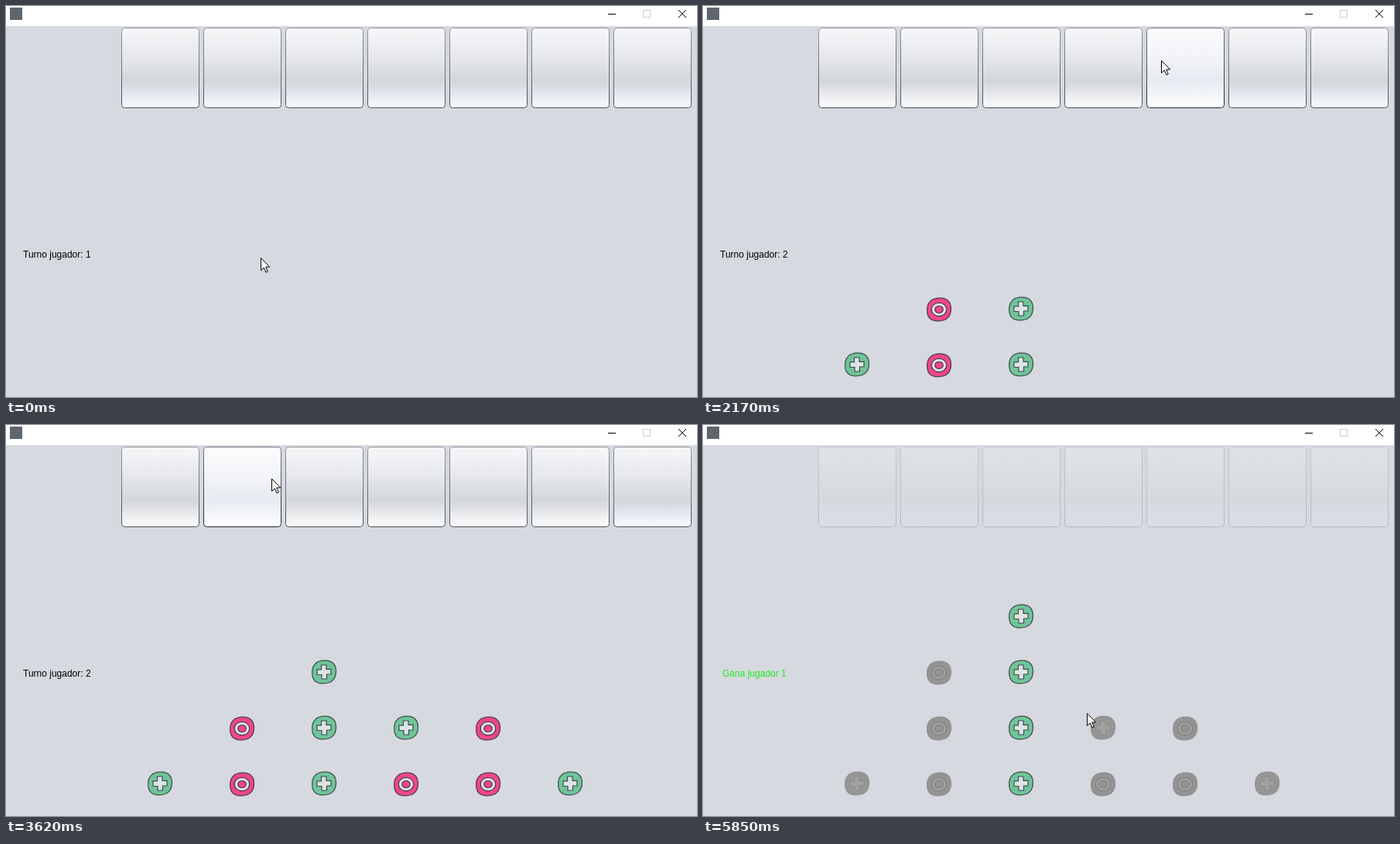
Animation, 893 px wide and 505 px high, one loop 8.16 s. Source, as an HTML page with a canvas:

```html
<!DOCTYPE html>
<html lang="es">
<head>
<meta charset="utf-8">
<title>Cuatro en raya</title>
<style>
html, body { margin: 0; width: 100%; height: 100%; overflow: hidden; background: #d6d9df; }
canvas { display: block; position: absolute; left: 0; top: 0; }
#label { position: absolute; top: 314px; white-space: nowrap;
  font: 12px/14px "Liberation Sans", Arial, sans-serif; }
</style>
</head>
<body>
<canvas id="stage" width="893" height="505"></canvas>
<div id="label"></div>
<script>
const ctx = document.getElementById('stage').getContext('2d');
const label = document.getElementById('label');
const LOOP = 8160, TICK = 65.76, COLS = 7, PITCH = 106;

// Pointer path: tick, x, y
const path = [
  [-1, 329, 325], [0, 326, 314], [2, 307, 254], [4, 276, 211], [6, 211, 139], [7, 202, 108],
  [9, 198, 82], [10, 198, 82], [12, 285, 81], [14, 305, 79], [15, 310, 78], [17, 379, 76],
  [20, 379, 76], [22, 325, 74], [24, 325, 74], [25, 371, 74], [27, 378, 74], [29, 592, 70],
  [31, 600, 70], [32, 700, 70], [34, 705, 70], [36, 510, 69], [37, 489, 69], [41, 489, 69],
  [43, 597, 70], [45, 597, 70], [47, 425, 70], [49, 405, 70], [51, 343, 69], [52, 325, 70],
  [54, 325, 70], [57, 398, 67], [61, 400, 66], [64, 405, 65], [66, 470, 72], [67, 526, 79],
  [69, 626, 150], [70, 616, 175], [72, 545, 212], [75, 450, 385], [76, 400, 383],
  [78, 305, 330], [79, 292, 277], [80, 300, 227], [83, 430, 467], [85, 496, 372]
];

// Clicks: tick pressed, column; the disc lands one tick later, players alternate
const clicks = [[10, 0], [14, 1], [18, 2], [23, 1], [26, 2], [30, 4], [33, 5],
  [37, 3], [40, 3], [44, 4], [48, 2], [53, 1], [60, 2]];
const WIN_COL = 2;

// Button looks: fill stops, then top and bottom border
const looks = {
  fresh:    ['#f6f7f9', '#e4e6e9', '#d4d7da', '#d9dde5', '#f8fbff', '#92969c', '#4c5157'],
  normal:   ['#f6f7f9', '#e4e6e9', '#d4d7da', '#dcdee1', '#fcfdfd', '#92969c', '#4c5157'],
  hover:    ['#fcfcfd', '#f1f3f7', '#e7eaf1', '#eceff4', '#ffffff', '#737980', '#22272e'],
  pressed:  ['#c6cad3', '#b0b6c1', '#a1a8b5', '#adb5c3', '#d0d8e5', '#15181c', '#555c66'],
  disabled: ['#dfe2e6', '#dadde1', '#d5d8dc', '#d7dae2', '#d9dde5', '#c3c7cc', '#b6babf']
};

const body = new Path2D('M-15.3 2C-16-9-10-14.6 1-14.8C11-15 15.5-9 15.5-1C15.5 9 10 14.8-1 14.8C-10 15-15 11-15.3 2Z');
const plus = new Path2D('M-3.5-9H3V-3.7H9V3H3.5V9H-3V3.5H-9V-3.2H-3.5Z');
const arrow = new Path2D('M.5 .5V16.5L4.3 13L7 19L9.3 18L6.7 12H11.7Z');

function ellipse(x, y, rx, ry) {
  const p = new Path2D();
  p.ellipse(x, y, rx, ry, 0, 0, 2 * Math.PI);
  return p;
}
const ring = ellipse(0, 0, 9.7, 8.7), core = ellipse(0, 0, 5.3, 4.5), halo = ellipse(0, 0, 12, 12);

function paint(shape, fill, line, width = 1.2) {
  ctx.fillStyle = fill;
  ctx.fill(shape);
  if (!line) return;
  ctx.strokeStyle = line;
  ctx.lineWidth = width;
  ctx.stroke(shape);
}

function at(x, y, draw) {
  ctx.save();
  ctx.translate(x, y);
  draw();
  ctx.restore();
}

function pointer(tick) {
  const i = path.findIndex(p => p[0] >= tick);
  if (i < 0) return path[path.length - 1].slice(1);
  if (i === 0) return path[0].slice(1);
  const [a, ax, ay] = path[i - 1], [b, bx, by] = path[i];
  const u = (tick - a) / (b - a);
  return [Math.round(ax + (bx - ax) * u), Math.round(ay + (by - ay) * u)];
}

function columnAt([x, y]) {
  const col = Math.floor((x - 149) / PITCH);
  return y >= 28 && y < 132 && col >= 0 && col < COLS && (x - 149) % PITCH < 101 ? col : -1;
}

function gradient(y0, y1, stops) {
  const g = ctx.createLinearGradient(0, y0, 0, y1);
  stops.forEach(([pos, color]) => g.addColorStop(pos, color));
  return g;
}

function button(col, look) {
  const c = looks[look], box = new Path2D();
  box.roundRect(149.5 + col * PITCH, 28.5, 100, 103, 4);
  const fill = gradient(29, 131, [0, 0.4, 0.66, 0.74, 1].map((pos, i) => [pos, c[i]]));
  paint(box, fill, gradient(28, 132, [[0, c[5]], [1, c[6]]]), 1);
}

function disc(player, col, row, gray) {
  at(199 + col * PITCH, 463 - 72 * row + player, () => {
    if (player === 0) {
      paint(body, gray ? '#969696' : '#70c499', gray ? '#909090' : '#3f4b4d');
      paint(plus, gray ? '#a1a1a1' : '#dde4e6', gray ? '#8c8c8c' : '#3f4b4d');
    } else {
      const line = gray ? '#838383' : '#4a3b49';
      paint(body, gray ? '#949494' : '#ee468b', gray ? '#8e8e8e' : line);
      paint(ring, gray ? '#a0a0a0' : '#dfe3e8', line);
      paint(core, gray ? '#949494' : '#ee468b', line);
    }
  });
}

function titleBar() {
  ctx.fillStyle = '#fff';
  ctx.fillRect(0, 0, 893, 26);
  ctx.fillStyle = '#5f666d';
  ctx.fillRect(5, 2, 16, 16);
  ctx.fillStyle = '#000';
  ctx.fillRect(778, 10, 10, 1);
  ctx.lineWidth = 1;
  ctx.strokeStyle = '#ccc';
  ctx.strokeRect(823.5, 5.5, 9, 9);
  ctx.strokeStyle = '#000';
  ctx.stroke(new Path2D('M869 5L879 15M879 5L869 15'));
}

function render(tick) {
  const pos = pointer(tick), over = columnAt(pos);
  const pressed = clicks.some(c => c[0] === tick);
  const placed = clicks.filter(c => c[0] < tick);
  const won = placed.length === clicks.length;
  const visited = new Set();
  for (let k = 0; k <= tick; k++) visited.add(columnAt(pointer(k)));

  ctx.fillStyle = '#d6d9df';
  ctx.fillRect(0, 0, 893, 505);
  titleBar();
  for (let col = 0; col < COLS; col++) {
    button(col, won ? 'disabled' : col === over ? (pressed ? 'pressed' : 'hover')
      : visited.has(col) ? 'normal' : 'fresh');
  }
  const height = Array(COLS).fill(0);
  placed.forEach(([, col], i) => disc(i % 2, col, height[col]++, won && col !== WIN_COL));

  at(...pos, () => {
    if (pressed) paint(halo, '#d4d562');
    paint(arrow, pressed ? gradient(8, 14, [[0, '#f2f296'], [1, '#fff']]) : '#fff', '#000', 1);
  });

  label.textContent = won ? 'Gana jugador 1' : 'Turno jugador: ' + (placed.length % 2 + 1);
  label.style.left = won ? '25px' : '22px';
  label.style.color = won ? '#1cea1c' : '#000';
}

const start = performance.now();
let shown = null;
function frame() {
  const t = (performance.now() - start) % LOOP;
  const tick = Math.max(-1, Math.min(85, Math.floor((t - 254) / TICK)));
  if (tick !== shown) render(shown = tick);
  requestAnimationFrame(frame);
}
frame();
</script>
</body>
</html>
```
